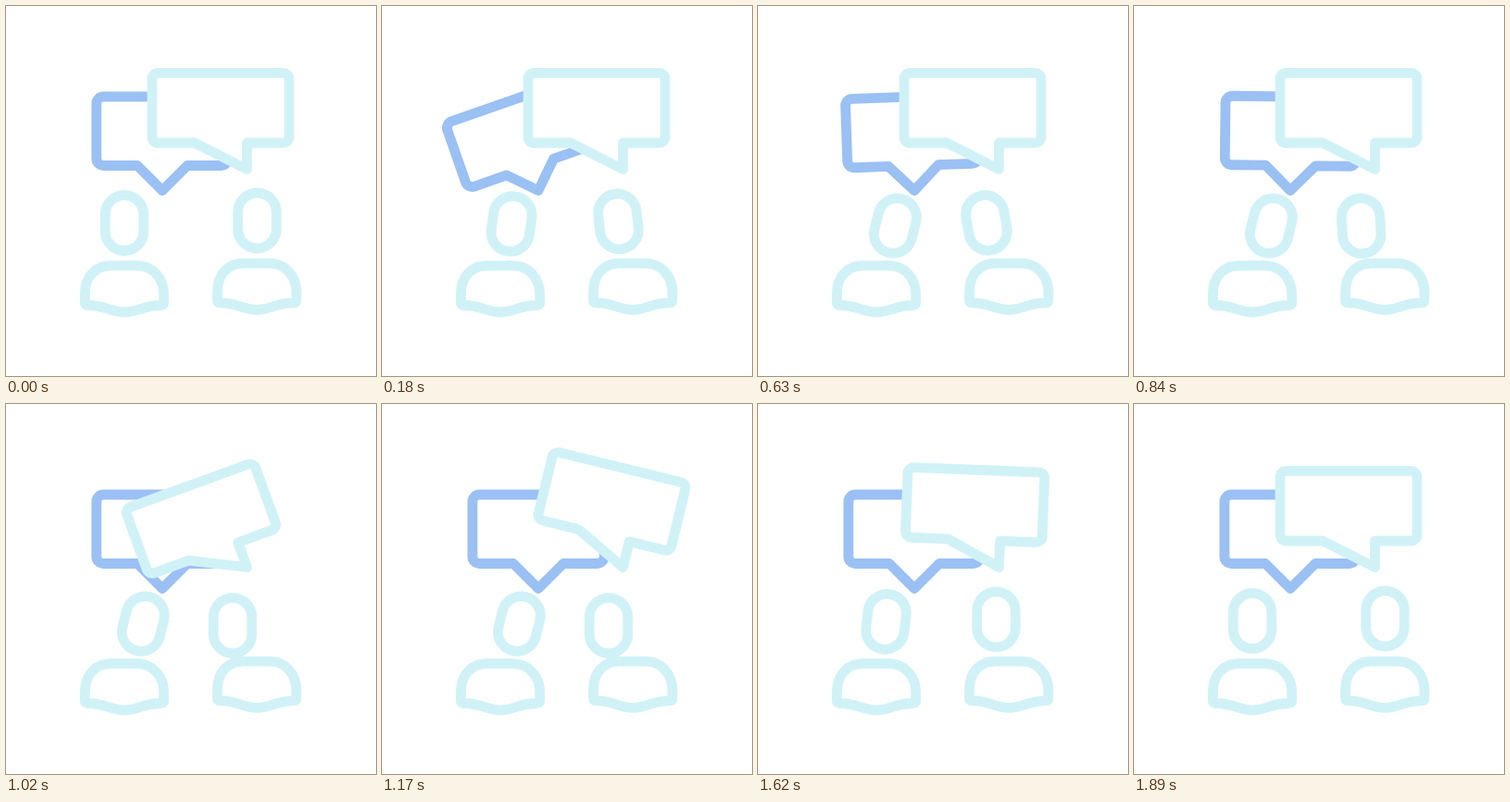
Recreate the animation shown at these times as an HTML page with a canvas. Size 400 by 400 pixels, loop 1920 ms.

```html
<!DOCTYPE html>
<html lang="en">
<head>
<meta charset="utf-8">
<title>Conversation</title>
<style>
html, body { margin: 0; width: 100%; height: 100%; overflow: hidden; background: #fff; }
canvas { display: block; width: 100vmin; height: 100vmin; }
</style>
</head>
<body>
<canvas width="400" height="400"></canvas>
<script>
const ctx = document.querySelector('canvas').getContext('2d');
const LOOP = 1920, STEP = 30;
const AQUA = '#d0f2f7', BLUE = '#9bc0f3';

// Turning points of a bubble's damped swing: time in ms, angle in degrees.
const swingTimes = [0, 165, 325, 510, 730, 900];
const swingAngles = [0, -20, 14, -8, 2.5, 0];

// Smooth step from 0 to 1 between two times.
function ramp(t, from, to) {
  const p = Math.min(1, Math.max(0, (t - from) / (to - from)));
  return (1 - Math.cos(Math.PI * p)) / 2;
}

// Rises to 1, holds, then falls back to 0.
const hold = (t, a, b, c, d) => ramp(t, a, b) - ramp(t, c, d);

function swing(t) {
  let angle = 0;
  for (let i = 1; i < swingTimes.length; i++) {
    angle += (swingAngles[i] - swingAngles[i - 1]) * ramp(t, swingTimes[i - 1], swingTimes[i]);
  }
  return angle;
}

// Rounded box with a tail hanging from its bottom edge.
function bubblePath({ left, top, right, bottom, tail, tip, radius }) {
  const p = new Path2D();
  p.moveTo((left + right) / 2, top);
  p.arcTo(right, top, right, bottom, radius);
  p.arcTo(right, bottom, left, bottom, radius);
  p.lineTo(tail[1], bottom);
  p.lineTo(tip[0], tip[1]);
  p.lineTo(tail[0], bottom);
  p.arcTo(left, bottom, left, top, radius);
  p.arcTo(left, top, right, top, radius);
  p.closePath();
  return p;
}

function makeBubble(color, delay, box) {
  return { color, delay, path: bubblePath(box), pivot: box.tip };
}

const bubbles = [
  makeBubble(BLUE, 0, {
    left: 97.8, top: 98, right: 240.2, bottom: 172.5, tail: [142, 196], tip: [169, 199.5], radius: 7.5
  }),
  makeBubble(AQUA, 855, {
    left: 158, top: 72.3, right: 306, bottom: 148, tail: [204, 260.5], tip: [260.5, 176.5], radius: 6.5
  })
];

const bodyPath = new Path2D(
  'M85.3 321V312C85.3 291 98 280.7 114 280.7H142C158 280.7 170.7 294 170.7 312V321Q170.7 323.5 168 323.5' +
  'C148 323.5 143 331 128 331C113 331 108 323.5 88 323.5Q85.3 323.5 85.3 321Z');
const headPath = new Path2D();
headPath.roundRect(-20.8, -30, 41.6, 60, 20.8);

// Strokes a path moved to x, y and turned by an angle in degrees.
function place(path, color, x, y, angle = 0) {
  ctx.save();
  ctx.translate(x, y);
  ctx.rotate(angle * Math.PI / 180);
  ctx.strokeStyle = color;
  ctx.stroke(path);
  ctx.restore();
}

function drawBubble({ path, color, delay, pivot: [x, y] }, t) {
  ctx.save();
  ctx.translate(x, y);
  ctx.rotate(swing(t - delay) * Math.PI / 180);
  ctx.translate(-x, -y);
  ctx.fillStyle = '#fff';
  ctx.fill(path);
  place(path, color, 0, 0);
  ctx.restore();
}

function drawPeople(t) {
  const lean = hold(t, 0, 300, 1420, 1860);
  const nod = hold(t, 300, 600, 1180, 1420);
  const sink = hold(t, 660, 960, 1190, 1420);
  const tilt = hold(t, 0, 300, 660, 960);

  place(bodyPath, AQUA, 0, 0);
  place(bodyPath, AQUA, 143.2, -2.6);
  place(headPath, AQUA, 128 + 18.3 * lean + 2 * nod, 234.5 + 1.5 * lean + 1.6 * nod, 12 * lean + 2 * nod);
  place(headPath, AQUA, 271.5 - 24.5 * lean - 2 * sink, 232 + 1.4 * lean + nod + 5.2 * sink, -10 * tilt);
}

function draw(t) {
  ctx.fillStyle = '#fff';
  ctx.fillRect(0, 0, 400, 400);
  ctx.lineWidth = 10.8;
  ctx.lineJoin = 'round';
  bubbles.forEach(b => drawBubble(b, t));
  drawPeople(t);
}

const start = performance.now();
function tick() {
  const t = (performance.now() - start) % LOOP;
  draw(Math.floor(t / STEP) * STEP);
  requestAnimationFrame(tick);
}
tick();
</script>
</body>
</html>
```
